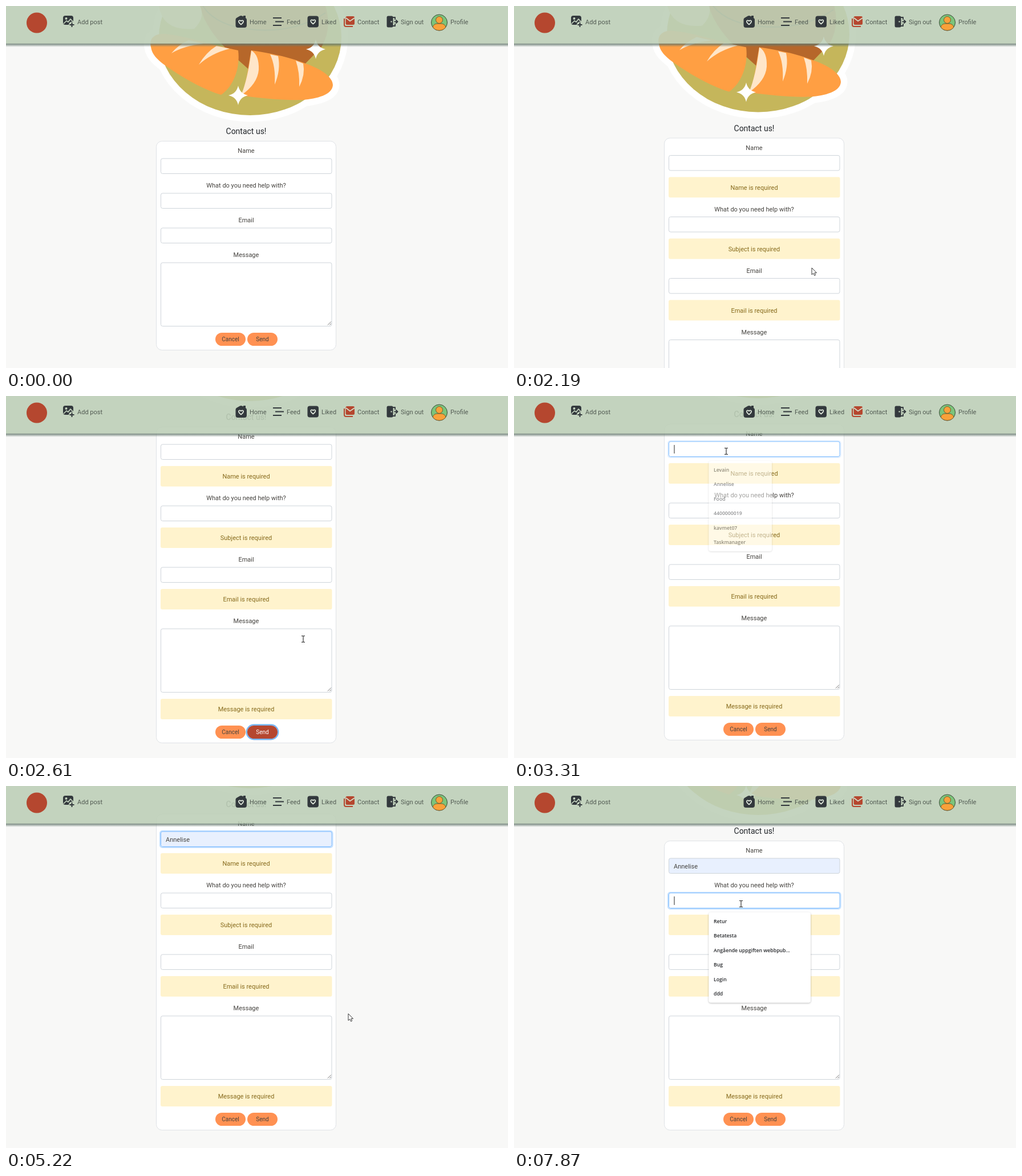
Write an HTML page that moves like this. It is 880 px wide and 636 px high and loops after 8 s.

```html
<!DOCTYPE html>
<html lang="en">
<head>
<meta charset="utf-8">
<title>Contact form</title>
<style>
html, body { margin: 0; width: 100%; height: 100%; overflow: hidden; background: #f8f8f7; }
svg { display: block; width: 880px; height: 636px; }
text { font: 11px Roboto, sans-serif; fill: #45433f; }
.mid { text-anchor: middle; }
.nav text { fill: #525b53; }
.title { font-size: 14px; fill: #212529; }
.alert { fill: #866a1c; }
.btn { font-size: 10px; }
.menu text, .small { font: 600 8.7px "Open Sans", "Noto Sans", sans-serif; fill: #26282b; }
.small { font-weight: 400; }
</style>
</head>
<body>
<svg viewBox="0 0 880 636">
  <defs>
    <linearGradient id="shade" x2="0" y2="1">
      <stop offset=".35" stop-color="#63766c" stop-opacity=".7"/>
      <stop offset="1" stop-color="#63766c" stop-opacity="0"/>
    </linearGradient>
    <filter id="lift" x="-10%" y="-10%" width="120%" height="120%">
      <feDropShadow dx="0" dy="1" stdDeviation="1.5" flood-opacity=".3"/>
    </filter>
    <path id="left" d="M254 72C250 56 262 46 285 50C320 54 350 66 407 78C411 110 398 142 377 156C350 148 320 132 290 112C266 96 256 86 254 72z"/>
    <path id="right" d="M430 78C470 84 500 91 525 101C556 112 573 126 573 139C572 156 545 163 520 165C485 166 445 162 412 157C424 130 424 105 430 78z"/>
    <ellipse id="plate" cx="428" cy="55" rx="160" ry="137"/>
    <path id="star" d="M0-17Q3-3 17 0Q3 3 0 17Q-3 3-17 0Q-3-3 0-17z"/>
    <path id="heart" d="M0 4C-7-1-3.500-5.500 0-2C3.500-5.500 7-1 0 4z" fill="none" stroke="#e3ebdf" stroke-width="1.700"/>
  </defs>
  <rect width="880" height="636" fill="#f8f8f7"/>

  <g id="art">
    <g fill="#fff" stroke="#fff" stroke-width="23" stroke-linejoin="round">
      <use href="#plate"/><use href="#left"/><use href="#right"/>
    </g>
    <use href="#plate" fill="#c5b65b"/>
    <path d="M340 0Q350 45 405 93L424 110L524 102L553 72Q572 40 560 0z" fill="#b6672a"/>
    <path d="M345 0Q370 38 440 42T560 12" fill="none" stroke="#5b4526" stroke-width="2"/>
    <path d="M268 0Q275 45 330 40Q350 20 340 0z" fill="#f3e6c4"/>
    <g fill="#ff9f43"><use href="#left"/><use href="#right"/></g>
    <g fill="#ffe6c9">
      <path d="M290 83Q301 69 320 60L346 66Q312 70 290 83z"/>
      <path d="M338 103Q350 82 369 70L392 75Q360 83 338 103z"/>
      <path d="M430 78Q444 86 443 112Q441 137 412 157Q424 128 430 78z"/>
      <path d="M463 85Q473 106 471 138Q482 112 477 88z"/>
      <path d="M508 96Q515 116 514 142Q525 121 521 101z"/>
    </g>
    <g fill="#fff">
      <use href="#star" x="543" y="76"/><use href="#star" x="407" y="157"/>
    </g>
  </g>

  <g id="form"></g>

  <rect y="65" width="880" height="7" fill="url(#shade)"/>
  <rect width="880" height="66" fill="#bed0b8" fill-opacity=".9"/>
  <g class="nav" fill="#33393d">
    <circle cx="54" cy="29.500" r="18" fill="#b5472f"/>

    <rect x="100" y="17" width="18" height="16" rx="4"/>
    <circle cx="105.500" cy="22" r="2" fill="#c4d4bf"/>
    <path d="M101 31L106 26L109 28L113 23L118 28V33" fill="none" stroke="#c4d4bf" stroke-width="1.700"/>
    <circle cx="115.500" cy="33" r="5.500" fill="#c4d4bf"/>
    <path d="M111.500 33H119.500M115.500 29V37" stroke="#33393d" stroke-width="2"/>
    <text x="125" y="32">Add post</text>

    <path d="M402.500 24Q402.500 22 404 21L410 17.500Q412 16.500 414 17.500L416 18.500V17H420V21Q422 22 422 24V34Q422 38 418 38H406.500Q402.500 38 402.500 34z"/>
    <use href="#heart" x="412" y="28.500"/>
    <text x="427" y="32">Home</text>

    <path d="M468 21H483M472 27.500H487M468 34H483" stroke="#33393d" stroke-width="2"/>
    <text x="492" y="32">Feed</text>

    <rect x="528.500" y="17.500" width="19.500" height="20" rx="4"/>
    <use href="#heart" x="538.300" y="27.500"/>
    <text x="553" y="32">Liked</text>

    <rect x="595.500" y="18" width="15.500" height="15" rx="2.500" fill="#b5472f"/>
    <path d="M596 21L603 26.500L611 21" fill="none" stroke="#d5dccb" stroke-width="1.700"/>
    <path d="M593 22V33Q593 36 596 36H608" fill="none" stroke="#b5472f" stroke-width="2"/>
    <text x="616" y="32">Contact</text>

    <rect x="667.500" y="17.500" width="11" height="20" rx="2.500"/>
    <circle cx="675.500" cy="27.500" r="1.200" fill="#c4d4bf"/>
    <path d="M678 20H682V24M678 35H682V31M680.500 27.500H686M683.500 24.500L686.500 27.500L683.500 30.500" fill="none" stroke="#33393d" stroke-width="1.800"/>
    <text x="692" y="32">Sign out</text>

    <circle cx="759.500" cy="29" r="14" fill="#7cc47a" stroke="#3c4a3a"/>
    <path d="M748 37Q750 31 756 31H763Q769 31 771 37Q767 43 759.500 43T748 37z" fill="#f9a13a" stroke="#5c4a25" stroke-width=".8"/>
    <circle cx="759.500" cy="24.500" r="6" fill="#f9a13a" stroke="#5c4a25" stroke-width=".8"/>
    <text x="779" y="32">Profile</text>
  </g>
  <g id="over"></g>
</svg>

<script>
const $ = id => document.getElementById(id);
const LOOP = 8000, STEP = 70, MAX_SCROLL = 188, PERSON = 'Annelise';
const labels = ['Name', 'What do you need help with?', 'Email', 'Message'];
const topics = ['Name', 'Subject', 'Email', 'Message'];
const names = ['Levain', PERSON, 'Food', '4400000019', 'kavmet07', 'Taskmanager'];
const subjects = ['Retur', 'Betatesta', 'Angående uppgiften webbpub...', 'Bug', 'Login', 'ddd'];

const starts = [0, 390, 1910, 3650, 4060, 4400, 4670, 4870, 5980, 6650, 7740, 7870];

// time, scroll
const scrollKeys = [[2120, 0], [2190, 5.5], [2260, 45], [2330, 82], [2400, 97],
  [2470, 100], [2540, 145], [2610, 183], [2680, MAX_SCROLL]];
// time, x, y
const mouseKeys = [[390, 729, 430], [600, 655, 465], [810, 550, 530], [1020, 470, 578], [1160, 449, 586],
  [1910, 450, 584], [2050, 505, 485], [2120, 522, 460], [2470, 522, 460], [2610, 521, 427],
  [2750, 519, 422], [2960, 470, 275], [3170, 385, 118], [3310, 372, 97],
  [3580, 372, 97], [3860, 372, 124], [3990, 372, 124], [4200, 375, 148],
  [4800, 375, 148], [5010, 450, 215], [5220, 600, 400], [5290, 622, 450], [5430, 560, 545], [5640, 443, 583], [5710, 447, 584],
  [6580, 447, 584], [6790, 390, 520], [7000, 354, 400], [7210, 385, 240], [7340, 398, 207]];

const clamp = v => Math.max(0, Math.min(1, v));
const between = (t, a, b) => t >= a && t < b;
const boxHeight = i => i === 3 ? 112 : 27;

function at(keys, t) {
  const i = keys.findIndex(k => k[0] > t);
  if (i === 0) return keys[0].slice(1);
  if (i < 0) return keys.at(-1).slice(1);
  const a = keys[i - 1], b = keys[i], f = (t - a[0]) / (b[0] - a[0]);
  return a.slice(1).map((v, j) => v + (b[j + 1] - v) * f);
}

const rect = (x, y, w, h, r, attrs) =>
  `<rect x="${x}" y="${y}" width="${w}" height="${h}" rx="${r}" ${attrs}/>`;
const text = (x, y, str, cls = '', attrs = '') =>
  `<text x="${x}" y="${y}" class="${cls}" ${attrs}>${str}</text>`;

function field(i, y, { ring, fill, value, preview, caret, alert }) {
  const h = boxHeight(i), top = y + 13.5, alertTop = top + h + 11.5;
  let out = text(421, y + 4, labels[i], 'mid');
  if (ring) out += rect(270, top - .5, 302.5, h + 2, 4, `fill="none" stroke="#bfdeff" stroke-width="2" opacity="${ring}"`);
  out += rect(271.5, top + .5, 299.5, h - .5, 3, `fill="${fill || '#fff'}" stroke="${ring ? '#80bdff' : '#ced4da'}"`);
  if (value) out += text(280, top + 18.5, value);
  if (preview) out += text(280, top + 18, preview, 'small');
  if (caret) out += `<path d="M${caret} ${top + 6.5}v15" stroke="#222"/>`;
  if (i === 3) out += `<path d="M564 ${top + h - 2}l6-6m-2.500 6l2.500-2.500" stroke="#666" stroke-width=".9"/>`;
  if (alert) out += rect(271, alertTop, 300.5, 36, 3, 'fill="#fff3cd"') +
    text(421, alertTop + 22, topics[i] + ' is required', 'mid alert');
  return out;
}

function button(x, y, label, { focus, hover } = {}) {
  const dark = focus && !hover;
  return `<g opacity="${hover ? .77 : 1}">` +
    (focus ? rect(x - 1.2, y - 1.2, 55.4, 25.4, 12.7, 'fill="none" stroke="#74b6fa" stroke-width="2.400"') : '') +
    rect(x, y, 53, 23, 11.5, `fill="${dark ? '#b5472f' : '#ff9152'}"`) +
    text(x + 26.5, y + 15.2, label, 'mid btn', dark ? 'style="fill:#fff"' : '') + '</g>';
}

function menu(items, y, w, hover, opacity) {
  const row = i => y + 15.5 + i * 25.5;
  let out = `<g class="menu" opacity="${opacity}"><path d="M351 ${y + 1}l5-6l5 6" fill="#fff"/>` +
    rect(341.5, y, w, 158.5, 4, 'fill="#fff" filter="url(#lift)"');
  if (hover >= 0) out += rect(344, row(hover) - 13, w - 5, 26, 3, 'fill="#f0f0f0"') +
    `<path d="M${w + 322.5} ${row(hover) - 3}l6 6m0-6l-6 6" stroke="#333" stroke-width="1.200"/>`;
  return out + items.map((s, i) => text(350, row(i) + 3, s)).join('') + '</g>';
}

const pointers = {
  arrow: '<path d="M0 0V12L2.800 9.600L4.600 13.600L6.600 12.700L4.900 8.800H8.500z" fill="#fff" stroke="#222" stroke-width=".9"/>',
  beam: '<path d="M-3-5.500H-1L0-5L1-5.500H3M0-5V5M-3 5.500H-1L0 5L1 5.500H3" fill="none" stroke="#222" stroke-width="1.100"/>',
  hand: '<path d="M-1.500 1.200Q0-.5 1.300 1.200V6L3 5.600L4.600 6.300L6 6.600L7.300 7.800V11.500L5.800 16H-.8L-4.300 10.500Q-4.800 8.500-3 8.700L-1.500 10z" fill="#fff" stroke="#222"/>'
};

function draw(t) {
  const alertOn = [between(t, 1230, 6050), t >= 1230, t >= 1230, t >= 1230];
  const extra = 47 * alertOn.filter(Boolean).length;
  const scroll = Math.min(at(scrollKeys, t)[0], extra);
  const [mx, my] = at(mouseKeys, t);

  const tops = labels.map((_, i) => 254 + 61 * i + 47 * alertOn.slice(0, i).filter(Boolean).length);
  const sendTop = 574 + extra;
  const py = my + scroll;
  const onSend = t >= 390 && Math.abs(mx - 449.5) < 27 && between(py, sendTop, sendTop + 23);
  const onInput = between(mx, 271, 571) &&
    tops.some((y, i) => between(py, y + 13.5, y + 13.5 + boxHeight(i)));

  const nameMenu = clamp((t - 3240) / 140) * (1 - clamp((t - 4330) / 210));
  const topicMenu = clamp((t - 7700) / 170);
  const hover = my > 142 ? 1 : my > 114 ? 0 : -1;
  const picked = t >= 4400;
  const preview = !picked && nameMenu > 0 && hover >= 0 ? names[hover] : '';
  const blink = (t - 4400) % 1060 < 530;

  const states = [
    {
      ring: clamp((t - 3240) / 140) * (1 - clamp((t - 5910) / 140)),
      fill: picked || preview ? '#e8f0fe' : '',
      value: picked ? PERSON : '',
      preview,
      caret: between(t, 3310, 4400) && !preview ? 281 : between(t, 4400, 5640) && blink ? 322.5 : 0
    },
    { ring: topicMenu, caret: t >= 7740 ? 281 : 0 }, {}, {}
  ];

  $('art').setAttribute('transform', `translate(0 ${-scroll})`);
  $('form').setAttribute('transform', `translate(0 ${-scroll})`);
  $('form').innerHTML = text(421, 225, 'Contact us!', 'mid title') +
    rect(263.5, 237.5, 315, 367 + extra, 10, 'fill="#fff" stroke="#dfe2e6"') +
    states.map((s, i) => field(i, tops[i], { ...s, alert: alertOn[i] })).join('') +
    button(367, sendTop, 'Cancel') +
    button(423, sendTop, 'Send', { focus: between(t, 1230, 3310) || between(t, 5980, 7740), hover: onSend });

  const overMenu = nameMenu > 0 && my > 112;
  const kind = onSend ? 'hand' : onInput && !overMenu ? 'beam' : 'arrow';
  $('over').innerHTML =
    (nameMenu ? menu(names, 114, 110.5, hover, nameMenu) : '') +
    (topicMenu ? menu(subjects, 222, 178.5, -1, topicMenu) : '') +
    (t >= 390 ? `<g transform="translate(${mx} ${my})">${pointers[kind]}</g>` : '');
}

let shown = -1;
function tick() {
  const t = performance.now() % LOOP;
  const base = starts.findLast(s => s <= t);
  const stepped = base + Math.floor((t - base) / STEP) * STEP;
  if (stepped !== shown) draw(shown = stepped);
  requestAnimationFrame(tick);
}
tick();
</script>
</body>
</html>
```
